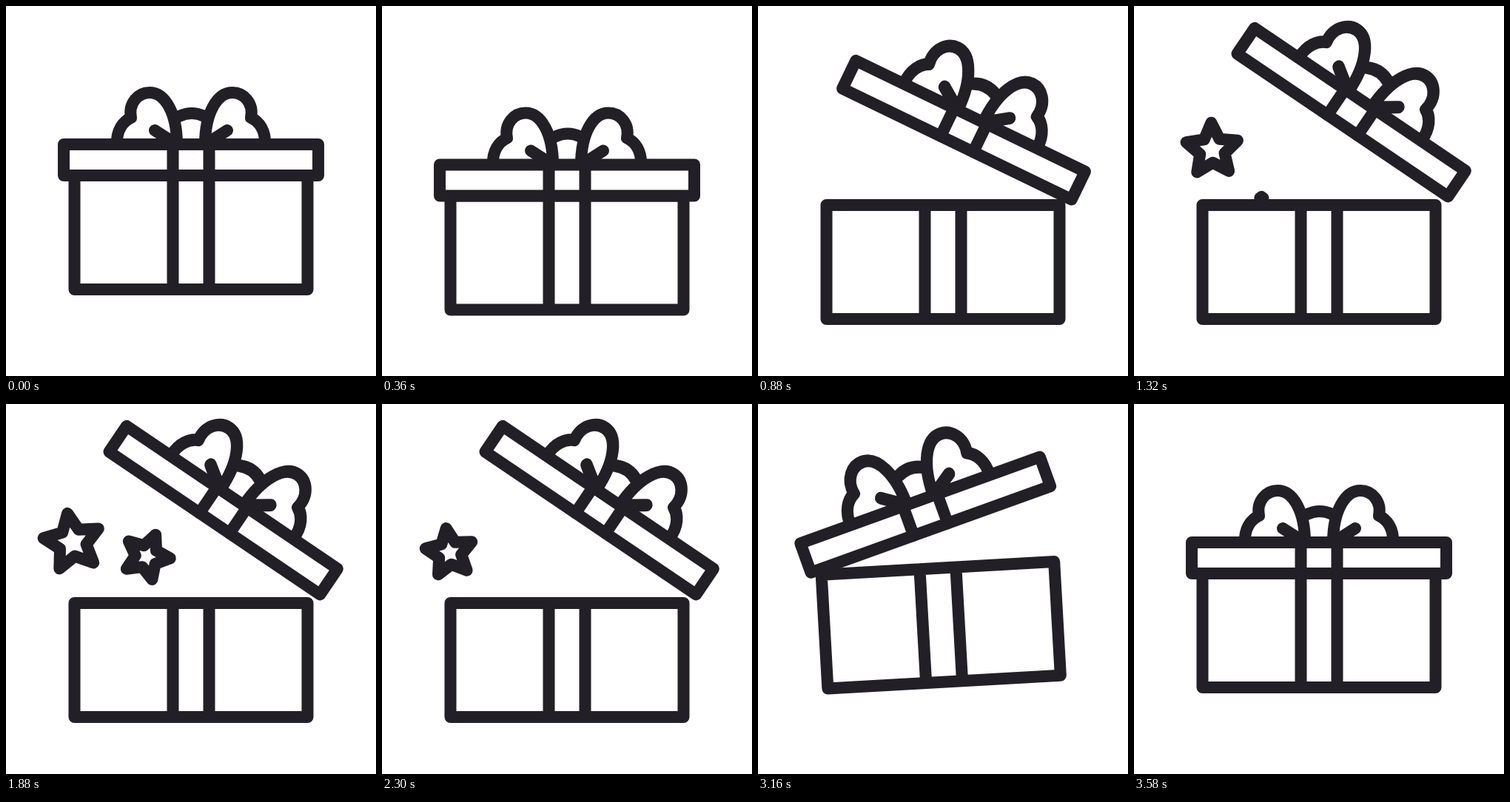
An HTML page with a canvas for the animation above (3600 ms loop, 500 by 500 pixels).

```html
<!DOCTYPE html>
<html>
<head>
<meta charset="utf-8">
<title>Gift box</title>
<style>
  html, body { margin: 0; width: 100%; height: 100%; overflow: hidden; background: #fff; }
  canvas { display: block; }
</style>
</head>
<body>
<canvas id="stage" width="500" height="500"></canvas>
<script>
const ctx = document.getElementById('stage').getContext('2d');
const LOOP = 3600, DEG = Math.PI / 180;

const box = new Path2D('M92.5 229H407.5V383H92.5ZM225.5 229V383M274.5 229V383');
const lid = new Path2D('M78 187H422V229H78Z');
const lidRibbon = new Path2D('M225.5 187V229M274.5 187V229');
const knot = new Path2D('M234 149Q251 141 268 149');
const loop = new Path2D('M150 187C149 168 158 156 169 151C165 131 179 117 194 117C215 117 231 145 231 187M201 168L226 184');

// Keyframes are [time, value] pairs with an ease between neighbours.
const dropKeys = [[160, 0], [480, 40], [2530, 40], [2950, 0]];
const lidKeys = [[460, 0], [1080, 34.1], [2505, 34.1], [2925, 0], [3210, -18], [3350, 0]];
const rockKeys = [[2925, 0], [3220, -3.6], [3400, 15.7], [3520, -1.6], [3580, 0]];
const bowKeys = [[360, 1], [920, 1.078], [2400, 1.078], [2900, 1], [3160, 1.074], [3350, 1]];

const stars = [
  { start: 1095, span: 750, from: [170, 264], to: [82, 178], size: 36.5, spin: -2.5 },
  { start: 1310, span: 750, from: [172, 264], to: [204, 179], size: 31.8, spin: 33 },
  { start: 1738, span: 680, from: [97, 274], to: [82, 132], size: 43, spin: -16 }
];

function valueAt(keys, t) {
  if (t <= keys[0][0]) return keys[0][1];
  for (let i = 1; i < keys.length; i++) {
    const [t0, a] = keys[i - 1], [t1, b] = keys[i];
    if (t < t1) {
      const u = (t - t0) / (t1 - t0);
      return a + (b - a) * u * u * (3 - 2 * u);
    }
  }
  return keys[keys.length - 1][1];
}

function rotateAround(x, y, degrees) {
  ctx.translate(x, y);
  ctx.rotate(degrees * DEG);
  ctx.translate(-x, -y);
}

function drawStar({ start, span, from, to, size, spin }, t) {
  const u = (t - start) / span;
  if (u <= 0 || u >= 1) return;
  const p = Math.sin(Math.PI * u);
  const x = from[0] + (to[0] - from[0]) * p ** 1.5;
  const y = from[1] + (to[1] - from[1]) * p;
  const radius = size * Math.min(1, 1.5 * p);
  ctx.beginPath();
  for (let i = 0; i < 10; i++) {
    const angle = (i * 36 + spin * p) * DEG;
    const r = i % 2 ? radius * 0.48 : radius;
    ctx.lineTo(x + r * Math.sin(angle), y - r * Math.cos(angle));
  }
  ctx.closePath();
  ctx.stroke();
}

// The bow stretches upward from the top edge of the lid.
function drawBow(stretch) {
  ctx.save();
  ctx.translate(0, 187 * (1 - stretch));
  ctx.scale(1, stretch);
  ctx.stroke(knot);
  ctx.stroke(loop);
  ctx.translate(500, 0);
  ctx.scale(-1, 1);
  ctx.stroke(loop);
  ctx.restore();
}

function drawLid(angle, stretch) {
  const side = angle < 0 ? -1 : 1;
  const slip = 2 * Math.sin(Math.PI * Math.min(1, Math.abs(angle) / 34.1));
  ctx.save();
  ctx.translate(slip * 0.4, slip);
  rotateAround(250 + side * 192, 227, angle);
  drawBow(stretch);
  ctx.fill(lid);
  ctx.stroke(lid);
  ctx.stroke(lidRibbon);
  ctx.restore();
}

function draw(t) {
  ctx.fillStyle = '#fff';
  ctx.fillRect(0, 0, 500, 500);
  ctx.strokeStyle = '#221f26';
  ctx.lineWidth = 16;
  ctx.lineCap = ctx.lineJoin = 'round';

  stars.forEach(star => drawStar(star, t));

  const rock = valueAt(rockKeys, t);
  ctx.save();
  if (rock < 0) rotateAround(120, 351, rock);
  else rotateAround(415, 391, rock);
  ctx.translate(0, valueAt(dropKeys, t));
  ctx.stroke(box);
  drawLid(valueAt(lidKeys, t), valueAt(bowKeys, t));
  ctx.restore();
}

const begin = performance.now();
function tick() {
  draw((performance.now() - begin) % LOOP);
  requestAnimationFrame(tick);
}
tick();
</script>
</body>
</html>
```
